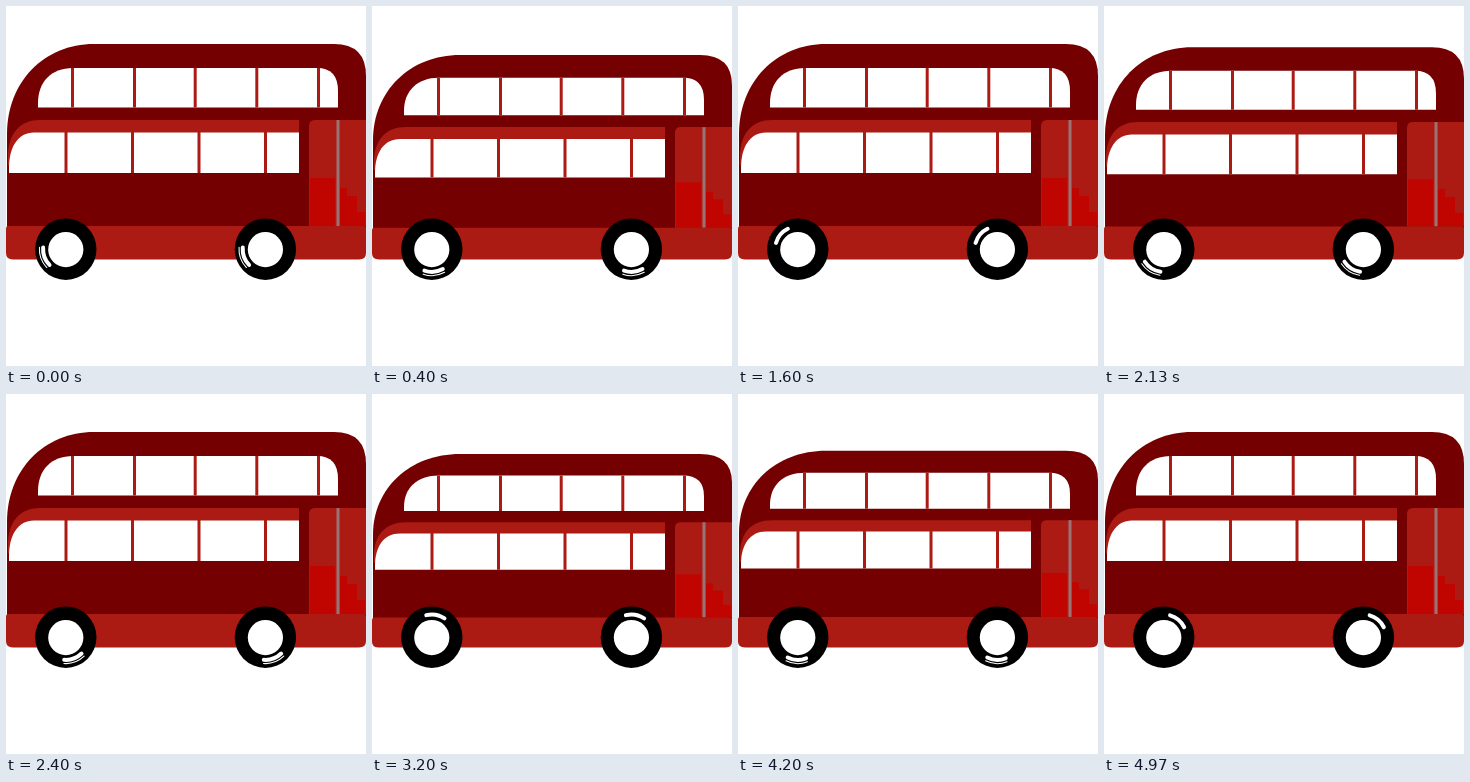
An HTML page that plays this animation: 360 by 360 pixels, repeating every 5000 ms.

```html
<!DOCTYPE html>
<html lang="en">
<head>
<meta charset="utf-8">
<title>Bouncing bus</title>
<style>
  html, body { margin: 0; width: 100%; height: 100%; overflow: hidden; background: #fff; }
  svg { display: block; width: 100vw; height: 100vh; }
</style>
</head>
<body>
<svg viewBox="0 0 360 360">
  <defs>
    <g id="tyre">
      <circle r="30.7"/>
      <circle r="17.6" cy="0.4" fill="#fff"/>
    </g>
  </defs>
  <g id="body">
    <path fill="#740001" d="M1 222V128C1 76 38 38 88 38H328Q360 38 360 70V222Z"/>
    <path fill="#fff" d="M32 101.500V97C32 76 45 62 67 62H311Q332 62 332 85V101.500Z"/>
    <path fill="#ab1b13" d="M2 152C2 127 14 114 34 114H293V127H26L2 160Z"/>
    <path fill="#fff" d="M3 167V162C3 141 12 126.500 28 126.500H293V167Z"/>
    <g id="pillars" stroke="#ab1b13" stroke-width="3"></g>
    <path fill="#ab1b13" d="M303 220V120Q303 114 309 114H360V220Z"/>
    <path fill="#c00400" d="M304 172H329V220H304ZM334 182H341V190H351V206H359V220H334Z"/>
    <path fill="#9a7376" d="M330.500 114H333.500V220H330.500Z"/>
    <path fill="#ab1b13" d="M2 220H358Q360 220 360 223V247Q360 253.500 353 253.500H7Q0 253.500 0 247V223Q0 220 2 220Z"/>
  </g>
  <g id="wheels"></g>
</svg>
<script>
const NS = 'http://www.w3.org/2000/svg';
const LOOP = 5000, FPS = 25, BASE = 253.5;
const byId = id => document.getElementById(id);

function add(parent, tag, attrs) {
  const el = document.createElementNS(NS, tag);
  for (const name in attrs) el.setAttribute(name, attrs[name]);
  return parent.appendChild(el);
}

// Arc centred on the positive x axis
function arc(radius, halfAngle) {
  const a = halfAngle * Math.PI / 180;
  const x = radius * Math.cos(a), y = radius * Math.sin(a);
  return `M${x} ${-y}A${radius} ${radius} 0 0 1 ${x} ${y}`;
}

function addPillars(xs, y1, y2) {
  for (const x of xs) add(byId('pillars'), 'line', { x1: x, x2: x, y1, y2 });
}
addPillars([66.5, 128.5, 189.2, 250.8, 312.5], 62, 101.5);
addPillars([60, 126.5, 193, 259.5], 126, 167);

const wheels = [59.8, 259.4].map(x => {
  const wheel = add(byId('wheels'), 'g', { transform: `translate(${x} 243.2)` });
  add(wheel, 'use', { href: '#tyre' });
  const shine = add(wheel, 'g', { fill: 'none', stroke: '#fff', 'stroke-linecap': 'round' });
  add(shine, 'path', { d: arc(22.7, 24), 'stroke-width': 4 });
  const rim = add(shine, 'path', { d: arc(26.4, 24), 'stroke-width': 1.1 });
  return { shine, rim };
});

// One squash lasting 8 steps in every 24
function squash(step) {
  const p = (step % 24 - 4) / 8;
  return p > 0 && p < 1 ? 0.102 * (1 - Math.cos(2 * Math.PI * p)) / 2 : 0;
}

function render(time) {
  const tick = Math.floor((time % LOOP + 4) * 30 / 1000) % 150;
  const step = Math.floor(tick * FPS / 30);
  byId('body').setAttribute('transform',
    `translate(0 ${BASE}) scale(1 ${1 - squash(step)}) translate(0 ${-BASE})`);
  const angle = 160 - 7.5 * step;
  const low = Math.sin(angle * Math.PI / 180) > 0;
  for (const { shine, rim } of wheels) {
    shine.setAttribute('transform', `rotate(${angle})`);
    rim.setAttribute('visibility', low ? 'visible' : 'hidden');
  }
}

function loop() {
  render(performance.now());
  requestAnimationFrame(loop);
}
loop();
</script>
</body>
</html>
```
